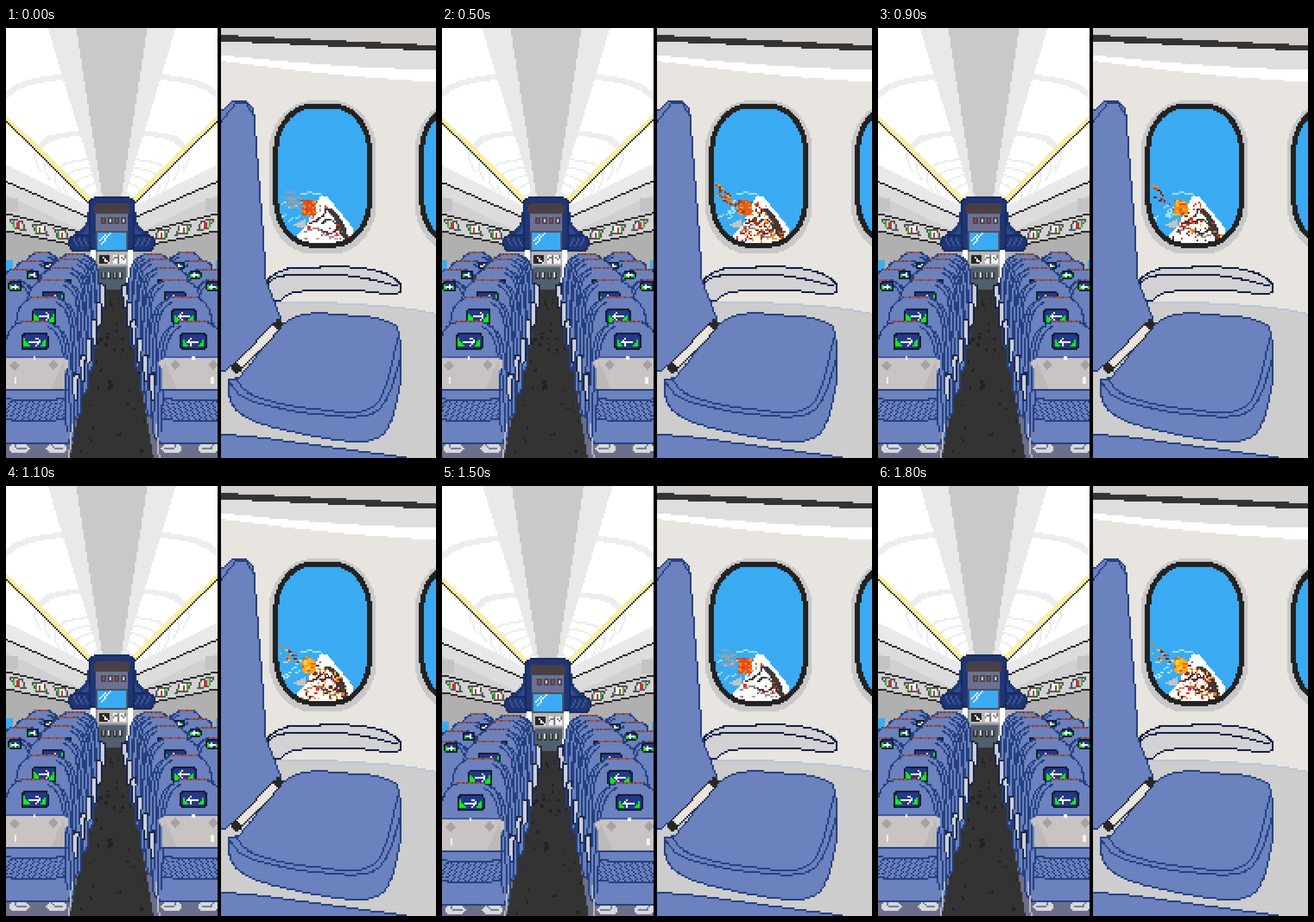
Animation of 748 by 748 pixels, one loop 1900 ms. Source, as an HTML page with a canvas:

```html
<!DOCTYPE html>
<html lang="en">
<head>
<meta charset="utf-8">
<title>Cabin</title>
<style>
  html, body { margin: 0; width: 100%; height: 100%; overflow: hidden; background: #000; }
  canvas { display: block; width: 748px; height: 748px; image-rendering: pixelated; }
</style>
</head>
<body>
<canvas id="stage" width="250" height="250"></canvas>
<script>
const N = 250, K = N / 748, PAD = 4;
const BLUE = '#6b82be', NAVY = '#25407f', DEEP = '#203674', INK = '#262626', SKY = '#3aabf3';
const stage = document.getElementById('stage').getContext('2d');
let g = stage, axis = 0;

function layer(w, h) {
  const c = document.createElement('canvas');
  c.width = w; c.height = h;
  return c.getContext('2d');
}

const range = (n, f) => Array.from({ length: n }, (_, i) => f(i));

// Coordinates are stage units; everything lands on the coarse pixel grid.
const X = x => (axis ? axis - x : x) * K;
const points = p => range(p.length / 2, i => [X(p[2 * i]), p[2 * i + 1] * K]);

function trace(p, w, closed) {
  const n = p.length;
  for (let i = 0; i < (closed ? n : n - 1); i++) {
    const [ax, ay] = p[i], [bx, by] = p[(i + 1) % n], o = (w - 1) / 2;
    const steps = Math.max(1, Math.ceil(Math.max(Math.abs(bx - ax), Math.abs(by - ay))));
    for (let s = 0; s <= steps; s++) {
      const f = s / steps;
      g.fillRect(Math.floor(ax + (bx - ax) * f - o), Math.floor(ay + (by - ay) * f - o), w, w);
    }
  }
}

function line(color, p, w = 1) {
  g.fillStyle = color;
  trace(points(p), w, false);
}

function poly(color, p, edge) {
  const q = points(p), ys = q.map(v => v[1]);
  g.fillStyle = color;
  for (let y = Math.floor(Math.min(...ys)); y <= Math.max(...ys); y++) {
    const hits = [], m = y + 0.5;
    q.forEach(([ax, ay], i) => {
      const [bx, by] = q[(i + 1) % q.length];
      if ((ay <= m) !== (by <= m)) hits.push(ax + (bx - ax) * (m - ay) / (by - ay));
    });
    hits.sort((a, b) => a - b);
    for (let i = 0; i + 1 < hits.length; i += 2) {
      const l = Math.round(hits[i]);
      g.fillRect(l, y, Math.round(hits[i + 1]) - l, 1);
    }
  }
  if (edge) { g.fillStyle = edge; trace(q, 1, true); }
}

const box = (color, x, y, w, h, edge) =>
  poly(color, [x, y, x + w, y, x + w, y + h, x, y + h], edge);

function dot(color, x, y, w = 1, h = 1) {
  g.fillStyle = color;
  g.fillRect(Math.floor(X(x)), Math.floor(y * K), w, h);
}

// Smooth curve through a few key points.
function spline(p, closed) {
  const n = p.length / 2, out = [];
  const at = (i, k) => p[2 * (closed ? (i + n) % n : Math.min(n - 1, Math.max(0, i))) + k];
  for (let i = 0; i < (closed ? n : n - 1); i++)
    for (let t = 0; t < 1; t += 0.125)
      for (const k of [0, 1]) {
        const [a, b, c, d] = range(4, j => at(i + j - 1, k));
        out.push(b + t / 2 * (c - a + t * (2 * a - 5 * b + 4 * c - d + t * (3 * b - a - 3 * c + d))));
      }
  if (!closed) out.push(...p.slice(-2));
  return out;
}

function rounded(x, y, w, h, rx, ry = rx) {
  return range(40, i => {
    const a = (i + 0.5) * Math.PI / 20, c = Math.cos(a), s = Math.sin(a);
    return [x + w / 2 + Math.sign(c) * (w / 2 - rx) + c * rx,
            y + h / 2 + Math.sign(s) * (h / 2 - ry) + s * ry];
  }).flat();
}

function both(sum, draw) {
  axis = 0; draw();
  axis = sum; draw();
  axis = 0;
}

function random(seed) {
  return () => {
    seed = seed + 0x6d2b79f5 | 0;
    let t = Math.imul(seed ^ seed >>> 15, 1 | seed);
    t = t + Math.imul(t ^ t >>> 7, 61 | t) ^ t;
    return ((t ^ t >>> 14) >>> 0) / 4294967296;
  };
}

// Side wall strips run towards the cockpit, given as height at the edge and slope.
const FAR = 147;
const edgeLine = (color, y, k, w) => line(color, [-12, y - 12 * k, FAR, y + FAR * k], w);
const strip = (color, y, k, y2, k2) =>
  poly(color, [-12, y - 12 * k, FAR, y + FAR * k, FAR, y2 + FAR * k2, -12, y2 - 12 * k2]);

function ceiling() {
  box('#ffffff', -12, -12, 400, 460);
  both(368, () => {
    line('#ededed', spline([-12, 126, 30, 98, 100, 84]), 3);
    line('#ededed', spline([52, 216, 78, 192, 128, 183]), 3);
    for (let i = 0; i < 5; i++) {
      const x = 92 + i * 13, y = 234 + i * 13, bx = 52 + i * 17, by = 213 + i * 17;
      line('#ececec', spline([x, y + 14, x + 12, y + 2, 150 + i * 4, y - 6]));
      line('#ececec', spline([bx, by, bx - 1, by + 18, bx + 8, by + 36]));
    }
    strip('#e9e9e9', 238, 0.5, 267, 0.44);
    strip('#dcdcdc', 267, 0.44, 323, 0.25);
    strip('#d0d0d0', 290, 0.48, 323, 0.25);
    box('#c3c3c3', -12, 297, 34, 22);
    strip('#b0b0b0', 323, 0.25, 450, 0);
    strip('#d2d2d2', 323, 0.25, 352, 0.21);
    edgeLine(INK, 267, 0.44);
    edgeLine(INK, 323, 0.25);
    edgeLine(INK, 353, 0.21);
    for (let i = 0; i < 3; i++) {
      const x = 7 + i * 38, y = 333 + i * 8.5;
      poly('#c9c9c9', [x, y, x + 20, y + 3, x + 27, y + 18, x + 8, y + 16], '#555555');
      box('#f5f5f5', x + 10, y + 4, 10, 11);
      box('#36b52c', x + 6, y + 3, 3, 11);
      box('#cf3030', x + 12, y + 5, 4, 9);
    }
    edgeLine('#f7eea6', 156, 1.01, 3);
    edgeLine(INK, 161, 1.01);
  });
  const beam = (color, top, low) => poly(color, [184 - top, -12, 184 + top, -12, 184 + low, 300, 184 - low, 300]);
  beam('#e9e9e9', 115, 21);
  beam('#c9c9c9', 64, 16);
}

function cockpit() {
  both(368, () => {
    line(DEEP, spline([150, 330, 146, 349, 126, 370]), 6);
    line('#2c4a92', spline([150, 330, 143, 350, 128, 366]), 2);
    poly(DEEP, rounded(110, 361, 40, 27, 11), '#18295c');
    for (let i = 0; i < 3; i++) line('#3d599e', [118 + i * 9, 367, 124 + i * 9, 378]);
  });
  poly(DEEP, rounded(144, 296, 80, 90, 11), '#18295c');
  box('#90909a', 155, 318, 58, 116);
  poly('#493f46', rounded(153, 304, 62, 24, 8));
  box('#6d7090', 156, 323, 55, 29);
  for (let i = 0; i < 4; i++) {
    const x = 165 + i * 12;
    box('#444758', x, 328, 8, 14);
    box(i % 2 ? '#cfcfcf' : '#c33b3b', x + 2, 331, 4, 8);
    if (i % 2 === 0) dot('#38bb36', x + 3, 329);
  }
  box(SKY, 157, 354, 55, 32, '#4a5060');
  line('#ffffff', [162, 371, 172, 361]);
  line('#ffffff', [166, 374, 181, 358]);
  box('#b9b9b9', 158, 389, 54, 25);
  box(INK, 161, 394, 19, 17);
  line('#ffffff', [169, 398, 172, 405, 177, 407]);
  box('#f4f4f4', 185, 394, 23, 17);
  line('#777777', [188, 401, 195, 397, 197, 407]);
  line('#777777', [201, 398, 204, 403, 208, 397]);
  poly('#51606c', [161, 415, 211, 415, 209, 456, 163, 456]);
  for (let i = 0; i < 4; i++) {
    box('#30383f', 166 + i * 10, 424, 7, 13);
    box(i % 2 ? '#d8d8d8' : '#a28a8a', 167 + i * 10, 426, 4, 8);
  }
}

function aisle() {
  box('#6b6f8a', -12, 600, 400, 170);
  poly('#333333', [170, 455, 207, 455, 259, 760, 108, 760]);
  const r = random(8);
  for (let i = 0; i < 46; i++) {
    const y = 470 + r() * 270, half = 18 + (y - 455) * 0.16;
    dot('#222222', 186 + (r() * 2 - 1) * half, y, 1 + (r() > 0.6), 1 + (r() > 0.5));
  }
}

function back(cx, top, h, bottom) {
  const half = spline([h * 0.42, top, h * 0.74, top + h * 0.25, h * 0.92, top + h * 0.8, h * 1.02, top + h * 2, h * 1.08, bottom - 20, h, bottom]);
  const side = s => range(half.length / 2, i => [cx + s * half[2 * i], half[2 * i + 1]]);
  return [...side(1), ...side(-1).reverse()].flat();
}

function screen(x, y, w) {
  const u = w / 46;
  poly('#24388a', rounded(x - 22 * u, y - 13 * u, 44 * u, 26 * u, 5 * u), '#131c33');
  for (const s of [-1, 1])
    poly('#0df20d', [x + s * 19 * u, y - 6 * u, x + s * 19 * u, y + 10 * u, x + s * 7 * u, y + 10 * u]);
  line('#ffffff', [x - 9 * u, y, x + 9 * u, y]);
  line('#ffffff', [x + 3 * u, y - 6 * u, x + 9 * u, y, x + 3 * u, y + 6 * u]);
}

function seat(cx, top, h, bottom) {
  poly(BLUE, back(cx + 7, top + 4, h, bottom - 6), NAVY);
  poly(BLUE, back(cx, top, h, bottom), NAVY);
  line(NAVY, spline([cx + h * 0.4, top + 8, cx + h * 0.7, top + h * 0.45, cx + h * 0.87, top + h * 1.2, cx + h * 0.95, bottom - 20]));
  for (let x = cx - h * 0.4; x < cx + h * 0.4; x += 3) dot(x % 5 < 3.5 ? '#9b5650' : '#65404c', x, top);
}

function windowSeat(i) {
  const cx = 5 + 23 * i - 1.3 * i * i, top = 438 - 20 * i + 1.5 * i * i;
  seat(cx, top, 45 - 5 * i, 620 - 25 * i);
  if (i < 3) screen(cx + 11 + 9 * i, top + 11 - i, 22 - 3 * i);
}

function aisleSeat(i) {
  const cx = 50 + 17 * i - 0.6 * i * i, top = 370 + 141 * 0.7 ** i, h = 58 - 4.5 * i;
  const x = cx + h + 9, y = 600 - 31 * i;
  poly('#cfd0d6', [x, y, x + 9, y + 3, x + 7, y + 46 - i, x - 2, y + 49 - i], '#18254c');
  seat(cx, top, h, 722 - 40 * i);
  if (i < 4) screen(cx, top + 34 - 1.5 * i, 46 - 4 * i);
}

function seatPocket() {
  line('#3b5aa6', [-12, 573, 103, 573]);
  poly('#c9c4c3', spline([-12, 576, 102, 576, 96, 606, 78, 628, -12, 628]));
  poly('#bdb9b8', [102, 576, 103, 628, 78, 628]);
  line(NAVY, [-12, 629, 105, 629]);
  for (const x of [15, 82]) poly('#a4a3a3', [x, 578, x + 9, 587, x, 596, x - 9, 587]);
  box('#f4f2ee', 14, 607, 5, 11);
  box('#ffffff', 47, 570, 5, 7);
  const base = Math.floor(645 * K);
  g.fillStyle = NAVY;
  for (let x = -PAD; x < 35; x++) for (let y = 0; y < 13; y++) {
    const sag = Math.round(Math.sin((x + 4) / 39 * Math.PI));
    if (y % 12 === 0 || (x + y) % 2 === 0 && (x + 2 * y) % 5 < 3)
      g.fillRect(axis ? Math.round(axis * K) - x - 1 : x, base + y + sag, 1, 1);
  }
  for (const x of [5, 70]) {
    poly('#d9d9dc', rounded(x, 725, 36, 13, 7));
    line('#777d8f', [x + 10, 727, x + 17, 733, x + 28, 733]);
  }
  line('#b9b9bd', [115, 690, 109, 748]);
}

function cabin() {
  ceiling();
  aisle();
  cockpit();
  both(376, () => {
    box(SKY, -12, 403, 24, 18);
    for (let i = 3; i >= 0; i--) windowSeat(i);
    for (let i = 5; i >= 0; i--) aisleSeat(i);
    seatPocket();
  });
}

// A band across the side wall, bowed by a sine.
function band(color, l0, r0, l1, r1, bow) {
  const rim = (l, r) => range(21, i => [374 + i * 18.7, l + (r - l) * i / 20 + bow * Math.sin(i * Math.PI / 20)]);
  poly(color, [...rim(l0, r0), ...rim(l1, r1).reverse()].flat());
}

function port(x) {
  const shape = (o, drop) => rounded(x - o, 131 - o + drop, 172 + 2 * o, 251 + 2 * o, 68 + o, 82 + o);
  poly('#c8c8c8', shape(8, 3));
  poly('#222222', shape(0, 0));
  g.globalCompositeOperation = 'destination-out';
  poly('#000000', shape(-9, 0));
  g.globalCompositeOperation = 'source-over';
}

function wall() {
  box('#e8e4e0', 374, 0, 374, 748);
  band('#d2cecb', 0, 0, 14, 32, 0);
  band('#dedede', 22, 38, 50, 76, 0);
  band('#333333', 12, 30, 23, 40, 0);
  band('#ffffff', 47, 73, 57, 94, 4);
  const floor = spline([374, 476, 500, 476, 600, 480, 690, 487, 760, 500]);
  poly('#cdcdcd', [...floor, 760, 748, 374, 748]);
  line('#b9c4da', floor);
  port(465);
  port(719);
  poly('#d2d2d4', spline([453, 443, 485, 420, 540, 416, 625, 418, 679, 437, 679, 462, 600, 456, 505, 459, 470, 475], true), '#101b42');
  line('#101b42', spline([454, 445, 482, 431, 590, 430, 680, 448]));
}

function bench() {
  poly(BLUE, spline([495, 506, 600, 500, 665, 511, 685, 540, 682, 640, 640, 716, 500, 703, 405, 669, 387, 615, 410, 604], true), NAVY);
  for (const k of [0, 1])
    line(NAVY, spline([388 + 11 * k, 616 - 7 * k, 425 + 8 * k, 648 - 7 * k, 540 - 5 * k, 672 - 9 * k,
      645 - 4 * k, 667 - 9 * k, 685 - 3 * k, 580 - 40 * k]));
  poly(BLUE, [360, 706, 430, 711, 700, 748, 360, 752], NAVY);
  poly(BLUE, [360, 160, 392, 127, 416, 126, 430, 140, 447, 360, 452, 440, 476, 500, 476, 515, 382, 597, 360, 592], NAVY);
  line(NAVY, [374, 163, 400, 131, 418, 131, 430, 150]);
  poly('#e8e4e0', [466, 513, 478, 522, 407, 596, 393, 587], '#222222');
  for (const [x, y] of [[473, 516], [400, 592]]) poly(INK, [x, y - 11, x + 10, y, x, y + 11, x - 10, y]);
}

const looks = {
  A: { specks: 24, trail: 0, hues: ['#d83020', '#e04a2c', '#a8a8a8'], flame: ['#e4501a', '#f29a1c', '#d83018'] },
  C: { specks: 62, trail: 22, hues: ['#8f1f14', '#d83020', '#ee8a1c', '#5b2a20'], flame: ['#f08a18', '#f8b82a', '#d8501a'] },
  D: { specks: 105, trail: 60, hues: ['#b53214', '#d9601c', '#8c2a16', '#f0a030'], flame: ['#dc621c', '#f29a2c', '#b83a18'] },
  E: { specks: 88, trail: 24, hues: ['#d83020', '#ee8020', '#6b2018', '#f6c030'], flame: ['#f6a81e', '#f8d03a', '#e0601c'] }
};

function blast(key) {
  const { specks, trail, hues, flame } = looks[key], r = random(key.charCodeAt(0) * 97);
  const pick = a => a[Math.floor(r() * a.length)];
  line('#9be3f2', spline([514, 288, 532, 287, 550, 291]));
  for (let i = 0; i < 9; i++) {
    const x = 477 + r() * 30, y = 304 + r() * 34;
    line('#9be3f2', [x, y, x + 7, y - 4]);
  }
  for (let i = 0; i < (trail ? 0 : 9); i++) {
    const x = 478 + r() * 26, y = 284 + r() * 34;
    line('#9a9fa5', [x, y, x + 8, y + 6 * r() - 3, x + 14, y + 12 * r() - 4]);
  }
  for (let i = 0; i < trail; i++) {
    const f = r(), lane = i % 2;
    dot(pick(hues), 477 + f * (lane ? 44 : 24), 270 + lane * 17 + f * 24 + r() * 8, 1 + (r() > 0.6));
  }
  poly('#c4c4c4', [500, 342, 521, 332, 522, 346, 507, 347]);
  poly('#ffffff', [546, 294, 558, 292, 606, 350, 600, 380, 520, 380, 503, 362, 524, 342, 528, 329]);
  poly('#3a3a3a', spline([556, 315, 570, 317, 590, 345, 594, 366, 584, 362, 572, 332], true));
  line('#3a3a3a', spline([529, 340, 549, 329, 556, 317]));
  line('#3a3a3a', spline([549, 340, 562, 333, 577, 345, 566, 357, 549, 352]));
  line('#8d8d8d', spline([520, 356, 540, 349, 560, 362, 580, 361]));
  for (let i = 0; i < specks; i++) {
    const d = 4 + Math.sqrt(r()) * 74;
    dot(pick(hues), 546 - d * 0.48 + r() * (10 + d * 1.1), 293 + d, 1 + (r() > 0.7), 1 + (r() > 0.8));
  }
  poly(flame[0], rounded(514, 300, 26, 27, 12));
  for (let i = 0; i < 32; i++) dot(pick(flame), 514 + r() * 24, 299 + r() * 26, 1 + (r() > 0.5));
}

const left = layer(130 + PAD, N + PAD);
left.translate(PAD, PAD);
g = left;
cabin();

const right = layer(N, N);
g = right;
wall();
bench();
g = stage;

const blasts = 'ACEDEDCAECDEDCEACDE';
const shake = [[0, 0], [0, 2], [0, 0], [-1, 0], [0, 0], [-1, 0], [0, 2], [-1, 0], [0, 2]];

function paint() {
  const step = Math.floor(performance.now() % 1900 / 100);
  const [dx, dy] = shake[step % shake.length];
  stage.drawImage(left.canvas, dx - PAD, dy - PAD);
  stage.fillStyle = '#000000';
  stage.fillRect(123, 0, 2, N);
  stage.fillStyle = SKY;
  stage.fillRect(125, 0, 125, N);
  blast(blasts[step]);
  stage.drawImage(right.canvas, 125, 0, 125, N, 125, 0, 125, N);
  requestAnimationFrame(paint);
}
paint();
</script>
</body>
</html>
```
